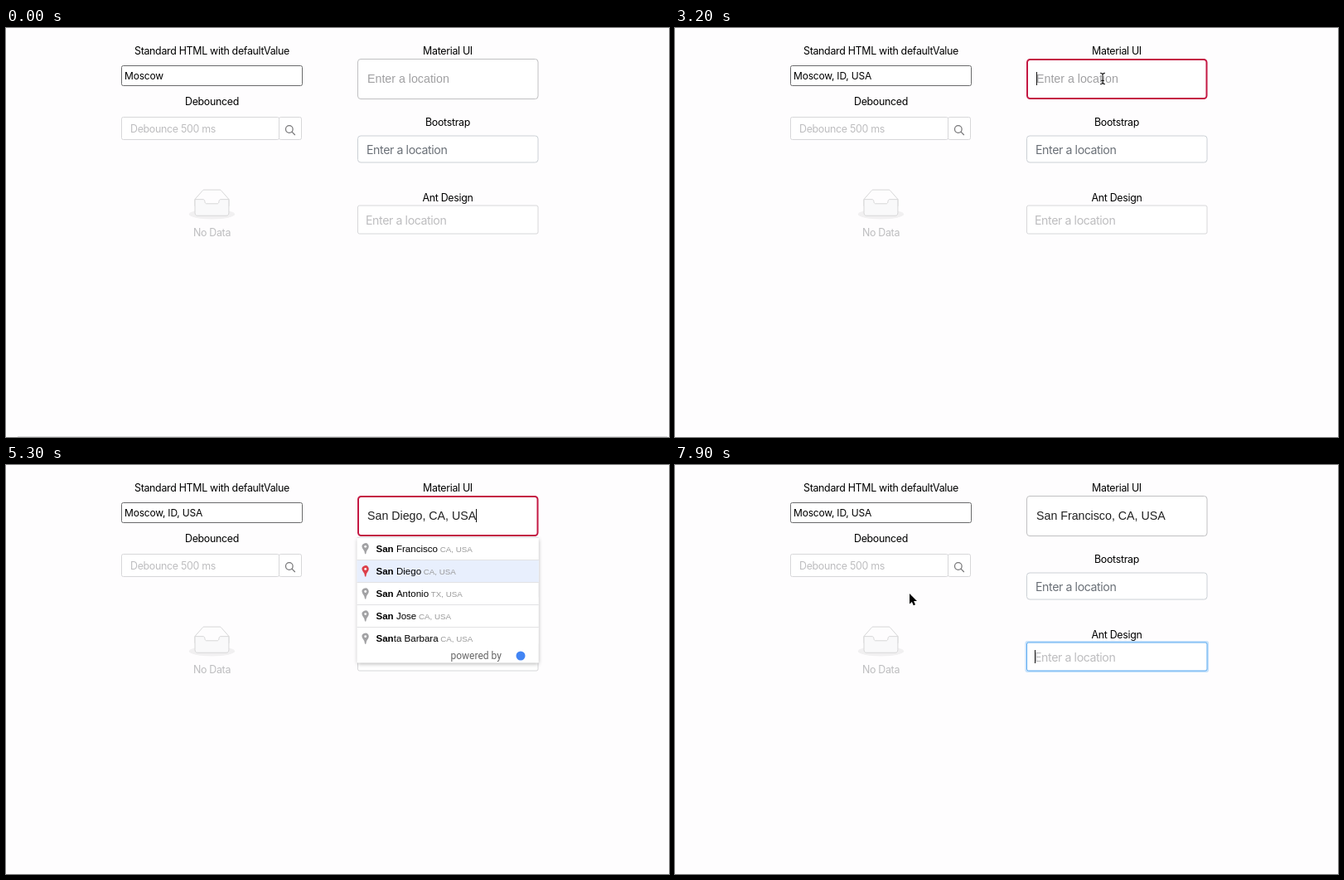
Write an HTML page with a canvas that moves like this. It is 800 px wide and 493 px high and loops after 8000 ms.

```html
<!DOCTYPE html>
<html lang="en">
<head>
<meta charset="utf-8">
<title>Location inputs</title>
<style>
html, body { margin: 0; width: 100%; height: 100%; overflow: hidden; background: #fefdfe; }
canvas { display: block; width: 800px; height: 493px; }
</style>
</head>
<body>
<canvas id="stage"></canvas>
<script>
const W = 800, H = 493, LOOP = 8000, STEP = 100;
const canvas = document.getElementById('stage');
const ctx = canvas.getContext('2d');
const dpr = window.devicePixelRatio || 1;
canvas.width = W * dpr;
canvas.height = H * dpr;

const UI = 'Inter, "Open Sans", sans-serif';
const ARIAL = '"Liberation Sans", Arial, sans-serif';
const FONT = {
  label: ['12.4px ' + UI, -0.3],
  native: ['12px ' + UI, -0.2],
  large: ['14.2px ' + UI, -0.42],
  material: ['14.22px ' + ARIAL, 0],
  bold: ['bold 11.56px ' + ARIAL, 0],
  item: ['11.56px ' + ARIAL, 0],
  small: ['9.78px ' + ARIAL, 0],
  credit: ['12px Roboto, sans-serif', 0]
};

// Field rectangles: x, y, width, height
const BOX = {
  native: [139, 45, 219, 25],
  search: [139, 107, 191, 28],
  button: [329, 107, 28, 28],
  material: [424, 37, 218.5, 49],
  bootstrap: [424, 129.5, 218.5, 33],
  ant: [424, 213.5, 218.5, 35]
};

const CITIES = [['San', ' Francisco', 'CA'], ['San', ' Diego', 'CA'], ['San', ' Antonio', 'TX'],
  ['San', ' Jose', 'CA'], ['San', 'ta Barbara', 'CA']].map(([q, rest, st]) => [q, rest, st + ', USA']);
const MOSCOWS = [['Moscow', '', 'Russia'], ['Moscow', '', 'ID, USA'], ['Moscow', ' Mills', 'MO, USA'],
  ['Moscow', '', 'PA, USA'], ['Moscow', '', 'TN, USA']];

// Highlighted row per key press
const MOSCOW_KEYS = [0, 2, 4, 3, 2, 1];
const CITY_KEYS = [0, 1, 2, 3, 4, 2, 1, 0];

// Pointer paths: time, x, y; the pointer hides while typing
const PATHS = [
  { end: 1900, keys: [[200, 503, 468], [300, 503, 468], [700, 370, 250], [1000, 232, 76], [1100, 225, 64]] },
  { end: 3700, keys: [[2600, 225, 64], [2700, 236, 65], [3000, 450, 66], [3200, 516, 61]] },
  { end: LOOP, keys: [[5900, 440, 142], [6100, 440, 142], [6300, 318, 122], [6400, 322, 121], [6500, 337, 120],
    [6600, 350, 123], [6900, 500, 146], [7000, 505, 147], [7300, 498, 232], [7400, 492, 232], [7800, 292, 158], [7900, 283, 155]] }
];

const SEARCH_TRAY = new Path2D('M55 12.76L44.85 1.26C44.37.47 43.66 0 42.9 0H21.1c-.75 0-1.46.47-1.95 1.26L9 12.76V22h46z');
const SEARCH_BIN = new Path2D('M41.6 15.9c0-1.6 1-2.9 2.2-2.9H55v18.1C55 33.3 53.7 35 52 35H12C10.3 35 9 33.3 9 31.1V13h11.2c1.2 0 2.2 1.3 2.2 2.9s1 2.9 2.2 2.9h14.8c1.2 0 2.2-1.3 2.2-2.9z');
const ARROW = new Path2D('M0 0V12.6L2.9 9.9L4.8 14.2L7 13.2L5.1 9.1H9z');
const HAND = new Path2D('M-1.6 8V1Q-1.6-.6 0-.6T1.6 1V4.6Q3-.1 4.4 4.9Q5.8 3.8 6.8 5.6Q8.8 5 8.8 7.2V10L7.2 14H0L-4.2 8.4Q-4.4 6.2-1.6 8z');

function setFont([font, spacing]) {
  ctx.font = font;
  ctx.letterSpacing = spacing + 'px';
}

function text(str, x, y, font, color, align = 'left') {
  setFont(font);
  ctx.textAlign = align;
  ctx.fillStyle = color;
  ctx.fillText(str, x, y);
  return ctx.measureText(str).width;
}

function box([x, y, w, h], color, line = 1, radius = 2) {
  const half = line / 2;
  ctx.beginPath();
  ctx.roundRect(x + half, y + half, w - line, h - line, radius);
  ctx.fillStyle = '#fff';
  ctx.fill();
  ctx.strokeStyle = color;
  ctx.lineWidth = line;
  ctx.stroke();
}

function glow([x, y, w, h], spread, color, radius) {
  ctx.beginPath();
  ctx.roundRect(x - spread, y - spread, w + 2 * spread, h + 2 * spread, radius);
  ctx.fillStyle = color;
  ctx.fill();
}

function caret(x, y, h) {
  ctx.fillStyle = '#111';
  ctx.fillRect(x, y, 1, h);
}

function inside(p, [x, y, w, h]) {
  return !!p && p.x >= x && p.x <= x + w && p.y >= y && p.y <= y + h;
}

function pointerAt(t) {
  const path = PATHS.find(({ end, keys }) => t >= keys[0][0] && t < end);
  if (!path) return null;
  const { keys } = path;
  const next = keys.findIndex(k => k[0] > t);
  if (next < 0) {
    const [, x, y] = keys[keys.length - 1];
    return { x, y };
  }
  const [t0, x0, y0] = keys[next - 1], [t1, x1, y1] = keys[next];
  const u = (t - t0) / (t1 - t0);
  return { x: x0 + (x1 - x0) * u, y: y0 + (y1 - y0) * u };
}

function drawPointer(p) {
  if (!p) return;
  const beam = ['native', 'search', 'material', 'bootstrap', 'ant'].some(k => inside(p, BOX[k]));
  ctx.save();
  ctx.translate(p.x, p.y);
  ctx.lineJoin = 'round';
  if (inside(p, BOX.button)) {
    ctx.fillStyle = '#fff';
    ctx.fill(HAND);
    ctx.strokeStyle = '#111';
    ctx.lineWidth = 1.1;
    ctx.stroke(HAND);
    ctx.beginPath();
    for (const x of [1.6, 3.6, 5.6]) { ctx.moveTo(x, 8.4); ctx.lineTo(x, 11.4); }
    ctx.lineWidth = 0.7;
    ctx.stroke();
  } else if (beam) {
    ctx.beginPath();
    for (const s of [-1, 1]) {
      ctx.moveTo(-2.8, s * 6.6);
      ctx.quadraticCurveTo(0, s * 6.6, 0, s * 4.6);
      ctx.quadraticCurveTo(0, s * 6.6, 2.8, s * 6.6);
    }
    ctx.moveTo(0, -5);
    ctx.lineTo(0, 5);
    ctx.moveTo(-1.8, 2.4);
    ctx.lineTo(1.8, 2.4);
    ctx.strokeStyle = '#fff';
    ctx.lineWidth = 2.4;
    ctx.stroke();
    ctx.strokeStyle = '#111';
    ctx.lineWidth = 1.1;
    ctx.stroke();
  } else {
    ctx.strokeStyle = '#fff';
    ctx.lineWidth = 2;
    ctx.stroke(ARROW);
    ctx.fillStyle = '#000';
    ctx.fill(ARROW);
  }
  ctx.restore();
}

function pin(x, y, color) {
  ctx.beginPath();
  ctx.arc(x, y, 4.1, Math.PI * 0.85, Math.PI * 0.15);
  ctx.quadraticCurveTo(x + 1, y + 5, x + 0.6, y + 9);
  ctx.lineTo(x - 0.6, y + 9);
  ctx.quadraticCurveTo(x - 1, y + 5, x - 3.7, y + 1.9);
  ctx.fillStyle = color;
  ctx.fill();
  ctx.beginPath();
  ctx.arc(x, y, 1.4, 0, Math.PI * 2);
  ctx.fillStyle = '#fff';
  ctx.fill();
}

function dropdown(x, y, items, active) {
  const w = 219.3, row = 27.1;
  ctx.save();
  ctx.shadowColor = 'rgba(0,0,0,.32)';
  ctx.shadowBlur = 5 * dpr;
  ctx.shadowOffsetY = 1.5 * dpr;
  ctx.fillStyle = '#fff';
  ctx.fillRect(x, y, w, 151.5);
  ctx.restore();
  items.forEach(([match, rest, region], i) => {
    const top = y + i * row;
    if (i === active) {
      ctx.fillStyle = '#e8effd';
      ctx.fillRect(x, top, w, row);
    }
    ctx.fillStyle = '#e2e2e4';
    ctx.fillRect(x, Math.round(top), w, 1);
    pin(x + 10.2, top + 11.3, i === active ? '#dc3f49' : '#a2a2a4');
    let at = x + 23;
    at += text(match, at, top + 17.6, FONT.bold, '#000');
    at += text(rest, at, top + 17.6, FONT.item, '#000');
    text(region, at + 2.7, top + 17.6, FONT.small, '#999');
  });
  text('powered by', x + 113, y + 147, FONT.credit, '#666');
  ctx.beginPath();
  ctx.arc(x + 197.5, y + 143, 5.5, 0, Math.PI * 2);
  ctx.fillStyle = '#4285f4';
  ctx.fill();
}

function emptyIcon() {
  ctx.save();
  ctx.translate(220, 194.2);
  ctx.scale(0.889, 0.889);
  ctx.beginPath();
  ctx.ellipse(32, 34, 31, 6.8, 0, 0, Math.PI * 2);
  ctx.fillStyle = '#f1f0f1';
  ctx.fill();
  ctx.translate(0, 1);
  ctx.strokeStyle = '#d5d5d7';
  ctx.lineWidth = 1.1;
  for (const [path, color] of [[SEARCH_TRAY, '#fefdfe'], [SEARCH_BIN, '#f9f9fa']]) {
    ctx.fillStyle = color;
    ctx.fill(path);
    ctx.stroke(path);
  }
  ctx.restore();
}

function searchIcon() {
  ctx.strokeStyle = '#757577';
  ctx.lineWidth = 1.2;
  ctx.beginPath();
  ctx.arc(341.8, 122, 4.3, 0, Math.PI * 2);
  ctx.moveTo(345, 125.2);
  ctx.lineTo(348.8, 129);
  ctx.stroke();
}

function materialValue(t) {
  if (t < 3700) return '';
  if (t < 4700) return 'san'.slice(0, Math.floor((t - 3600) / 100));
  const [match, rest, region] = CITIES[cityRow(t)];
  return match + rest + ', ' + region;
}

const keyAt = (keys, t, start) => t < start ? -1 : keys[Math.min(keys.length - 1, Math.floor((t - start) / STEP))];
const cityRow = t => keyAt(CITY_KEYS, t, 4700);
const moscowRow = t => keyAt(MOSCOW_KEYS, t, 1900);

function drawNative(t) {
  const focus = t >= 1100 && t < 3200;
  const row = moscowRow(t);
  const value = row < 0 ? 'Moscow' : MOSCOWS[row][0] + MOSCOWS[row][1] + ', ' + MOSCOWS[row][2];
  box(BOX.native, focus ? '#2450a4' : '#69696b', focus ? 2 : 1);
  const w = text(value, 143, 62, FONT.native, '#000');
  if (focus && t >= 1400) caret(143 + w, 51, 14);
}

function drawSearch(p) {
  const hover = inside(p, BOX.button);
  box(BOX.search, !hover && inside(p, BOX.search) ? '#8cc6fa' : '#d7d7d9');
  box(BOX.button, hover ? '#bfd3e3' : '#d7d7d9');
  text('Debounce 500 ms', 150, 125.5, FONT.label, '#bdbdbf');
  searchIcon();
}

function drawMaterial(t, p) {
  const focus = t >= 3200 && t < 7000;
  const hover = !focus && inside(p, BOX.material);
  box(BOX.material, focus ? '#c41843' : hover ? '#2b2b2b' : '#c0c0c2', focus ? 2 : 1, 3.5);
  const value = materialValue(t);
  const w = value ? text(value, 436, 66, FONT.material, '#212121') : 0;
  if (!value) text('Enter a location', 436, 66, FONT.material, '#a0a0a2');
  const blink = (t >= 4400 && t < 4700) || (t >= 5900 && t < 6400);
  if (focus && !blink) caret(Math.round(435.6 + w), 53, 16);
}

function drawBootstrap(t) {
  const focus = t >= 7000 && t < 7400;
  if (focus) glow(BOX.bootstrap, 2.8, '#bfdefd', 6);
  box(BOX.bootstrap, focus ? '#80bdff' : '#cbd0d5', 1, 3.5);
  text('Enter a location', 435, 151.5, FONT.large, '#6a7077');
  if (focus) caret(435, 139, 16);
}

function drawAnt(t) {
  const focus = t >= 7400;
  if (focus) glow(BOX.ant, 1.6, '#c6e2fb', 3);
  box(BOX.ant, focus ? '#5aa9f0' : '#d7d7d9');
  text('Enter a location', 434, 236.5, FONT.large, '#bdbdbf');
  if (focus) caret(434, 223, 16);
}

function draw(t) {
  const p = pointerAt(t);
  ctx.setTransform(dpr, 0, 0, dpr, 0, 0);
  ctx.fillStyle = '#fefdfe';
  ctx.fillRect(0, 0, W, H);
  if (t < 100) {
    ctx.fillStyle = '#dcdbdd';
    ctx.fillRect(14, 492, 784, 1);
  }
  for (const [str, x, y] of [['Standard HTML with defaultValue', 248.5, 31.8], ['Debounced', 248.5, 93],
    ['Material UI', 533, 31.8], ['Bootstrap', 533, 117.5], ['Ant Design', 533, 208.5]]) {
    text(str, x, y, FONT.label, '#000', 'center');
  }
  emptyIcon();
  text('No Data', 248.5, 250.5, FONT.label, '#bdbdbf', 'center');
  drawNative(t);
  drawSearch(p);
  drawMaterial(t, p);
  drawBootstrap(t);
  drawAnt(t);
  if (t >= 1600 && t < 2600) dropdown(138.5, 71, MOSCOWS, moscowRow(t));
  if (t >= 4000 && t < 5600) dropdown(423.5, 87, CITIES, cityRow(t));
  drawPointer(p);
}

const start = performance.now();
function frame() {
  const t = (performance.now() - start) % LOOP;
  draw(Math.floor(t / STEP) * STEP);
  requestAnimationFrame(frame);
}
frame();
</script>
</body>
</html>
```
